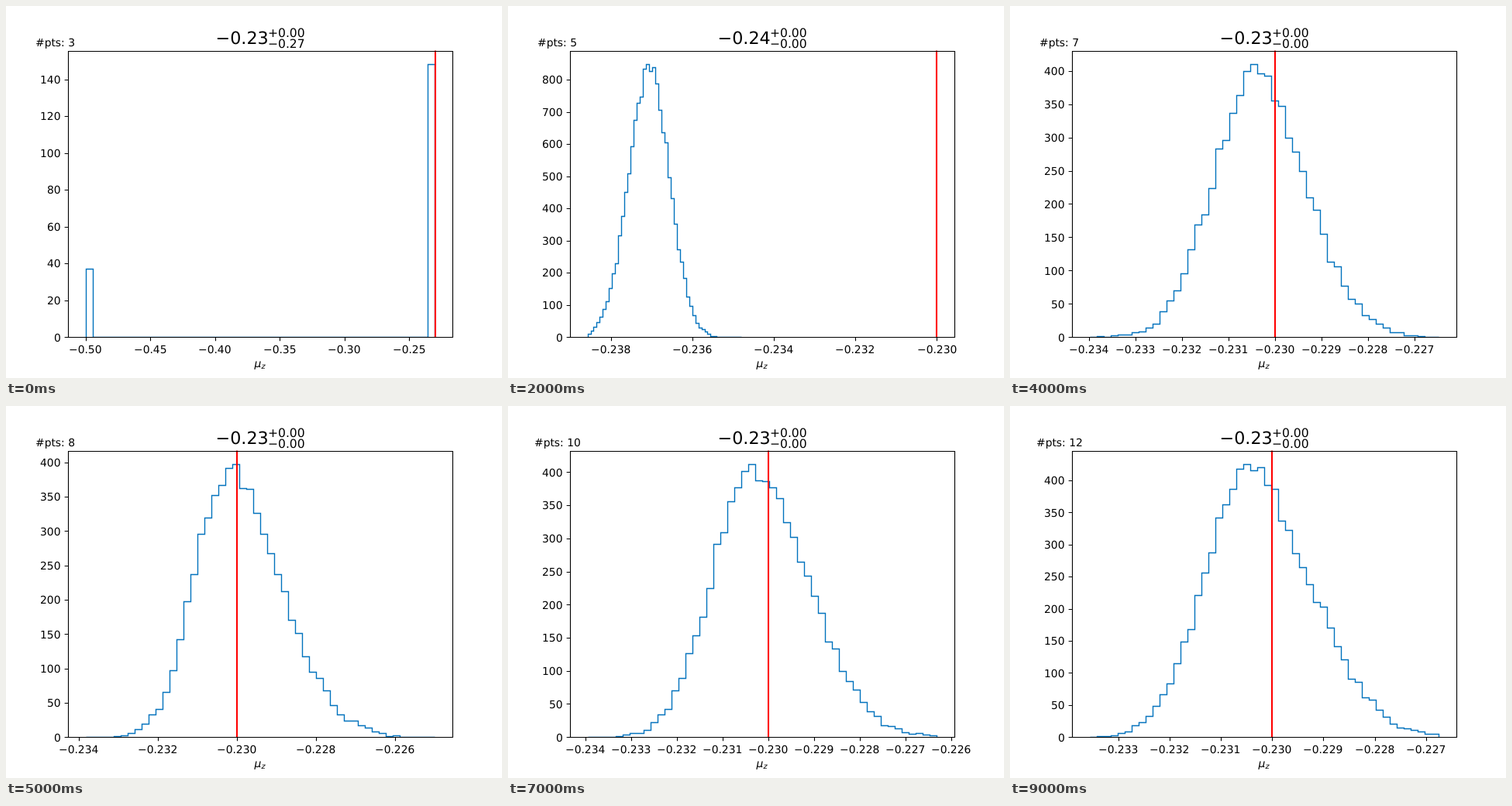
These frames come from a looping animation (640x480 px, 10 s). An HTML page:

```html
<!DOCTYPE html>
<html lang="en">
<head>
<meta charset="utf-8">
<title>Histogram by point count</title>
<style>
  html, body { margin: 0; width: 100%; height: 100%; overflow: hidden; background: #fff; }
  svg { display: block; width: 640px; height: 480px; }
  text { font: 13.89px "DejaVu Sans", sans-serif; fill: #000; text-rendering: geometricPrecision; }
  .main { font-size: 22.22px; }
  .script { font-size: 15.56px; }
  .mu { font-style: italic; }
  .sub { font-size: 9.72px; }
  .axis { fill: none; stroke: #000; stroke-width: 1.11; }
  .hist { fill: none; stroke: #0072bd; stroke-width: 1.39; }
  .mark { stroke: #f00; stroke-width: 2.08; }
</style>
</head>
<body>
<svg id="plot" viewBox="0 0 640 480"></svg>
<script>
const LEFT = 80, RIGHT = 576, TOP = 57.6, BOTTOM = 427.2;
const BINS = 50, START = 102.55, END = 553.45;
const TRUTH = -0.23, FIRST_POINTS = 3, STEP_MS = 1000;
const plot = document.getElementById('plot');
const pen = document.createElement('canvas').getContext('2d');
pen.font = '13.89px "DejaVu Sans", sans-serif';

const snap = v => Math.floor(v + 0.5) + 0.5;
const signed = (v, digits) => '\u2212' + Math.abs(v).toFixed(digits);
const text = (x, y, str, cls = '') => `<text x="${x}" y="${y}" class="${cls}">${str}</text>`;
// Labels start on whole pixels; align is 0.5 for centred and 1 for right-aligned.
const label = (x, y, str, align) =>
  text(Math.round(x - pen.measureText(str).width * align), y, str);

const spikes = () => b => b === 0 ? 1 : b === BINS - 1 ? 4 : 0;

// Lopsided bell with counting noise; widths are the half-widths at half height, in bins.
const bell = (centre, left, right) => (peak, seed) => {
  const random = () => (seed = seed * 16807 % 2147483647) / 2147483647;
  return b => {
    const d = b + 0.5 - centre;
    const h = peak * 2 ** -((d / (d < 0 ? left : right)) ** 2);
    return Math.max(0, h + (random() * 2 - 1) * Math.sqrt(h));
  };
};

// mark: x of the red line; step and gap: tick spacing in units and in pixels
const scenes = [
  { mark: 553.55, step: 0.05, gap: 83.5, peak: 148.15, low: 0.27, shape: spikes },
  { mark: 540, step: 0.005, gap: 100, peak: 139, title: -0.24, shape: bell(29.7, 7.5, 7.5) },
  { mark: 553.45, step: 0.002, gap: 105.1, peak: 848, title: -0.24, end: 301.2, shape: bell(20.2, 8, 7.5) },
  { mark: 424, step: 0.001, gap: 75, peak: 477.5, shape: bell(26, 8, 8.4) },
  { mark: 342, step: 0.001, gap: 60, peak: 410, shape: bell(23.5, 7, 8.5) },
  { mark: 298, step: 0.002, gap: 102, peak: 397, shape: bell(20, 5.4, 9) },
  { mark: 351.1, step: 0.001, gap: 58.7, peak: 409, shape: bell(23.5, 6.7, 9.2) },
  { mark: 336, step: 0.001, gap: 59, peak: 412, shape: bell(23.3, 6.6, 9.4) },
  { mark: 352.2, step: 0.001, gap: 59.3, peak: 415, shape: bell(24, 6.2, 9.7) },
  { mark: 338.25, step: 0.001, gap: 66.15, peak: 425, shape: bell(22.5, 7.3, 10.4) }
];

function heights({ shape, peak }, seed) {
  const raw = Array.from({ length: BINS }, (_, b) => b).map(shape(peak, seed));
  const top = Math.max(...raw);
  return raw.map(h => h * peak / top);
}

function render(scene, index) {
  const { mark, step, gap, peak, title = -0.23, low = 0, end = END } = scene;
  const limit = peak * 1.05;
  const yStep = [20, 50, 100].find(s => limit / s < 9);
  const digits = step < 0.01 ? 3 : 2;
  const yOf = h => BOTTOM - h * (BOTTOM - TOP) / limit;
  const binX = b => snap(START + (end - START) * b / BINS);
  const base = snap(BOTTOM);

  let outline = `M${binX(0)} ${base}`;
  heights(scene, index + 11).forEach((h, b) => { outline += `V${snap(yOf(h))}H${binX(b + 1)}`; });
  outline += `V${base}`;

  let axes = 'M80.5 58.5H576.5V427.5H80.5Z', labels = '';
  const xOf = k => mark + (k * step - TRUTH) / step * gap;
  const first = Math.ceil((LEFT - mark) / gap + TRUTH / step);
  for (let k = first; xOf(k) <= RIGHT; k++) {
    axes += `M${snap(xOf(k))} ${base}v4.86`;
    labels += label(xOf(k) - 0.27, 448, signed(k * step, digits), 0.5);
  }
  for (let h = 0; h <= limit; h += yStep) {
    axes += `M80.5 ${snap(yOf(h))}h-4.86`;
    labels += label(70.9, Math.round(yOf(h) + 5.3), String(h), 1);
  }

  plot.innerHTML =
    `<clipPath id="area"><rect x="${LEFT}" y="${TOP}" width="${RIGHT - LEFT}" height="${BOTTOM - TOP + 0.8}"/></clipPath>
    <g clip-path="url(#area)">
      <path class="hist" d="${outline}"/>
      <path class="mark" d="M${Math.round(mark)} 50V430"/>
    </g>
    <path class="axis" d="${axes}"/>${labels}` +
    label(63.8, 52, `#pts: ${index + FIRST_POINTS}`, 0.5) +
    text(270.6, 49, signed(title, 2), 'main') +
    text(338, 40, '+0.00', 'script') +
    text(338, 54, signed(low, 2), 'script') +
    text(320.6, 466, '\u03bc', 'mu') +
    text(329.6, 468, 'z', 'mu sub');
}

let shown = -1;
function tick() {
  const index = Math.floor(performance.now() / STEP_MS) % scenes.length;
  if (index !== shown) {
    shown = index;
    render(scenes[index], index);
  }
  requestAnimationFrame(tick);
}
tick();
</script>
</body>
</html>
```
